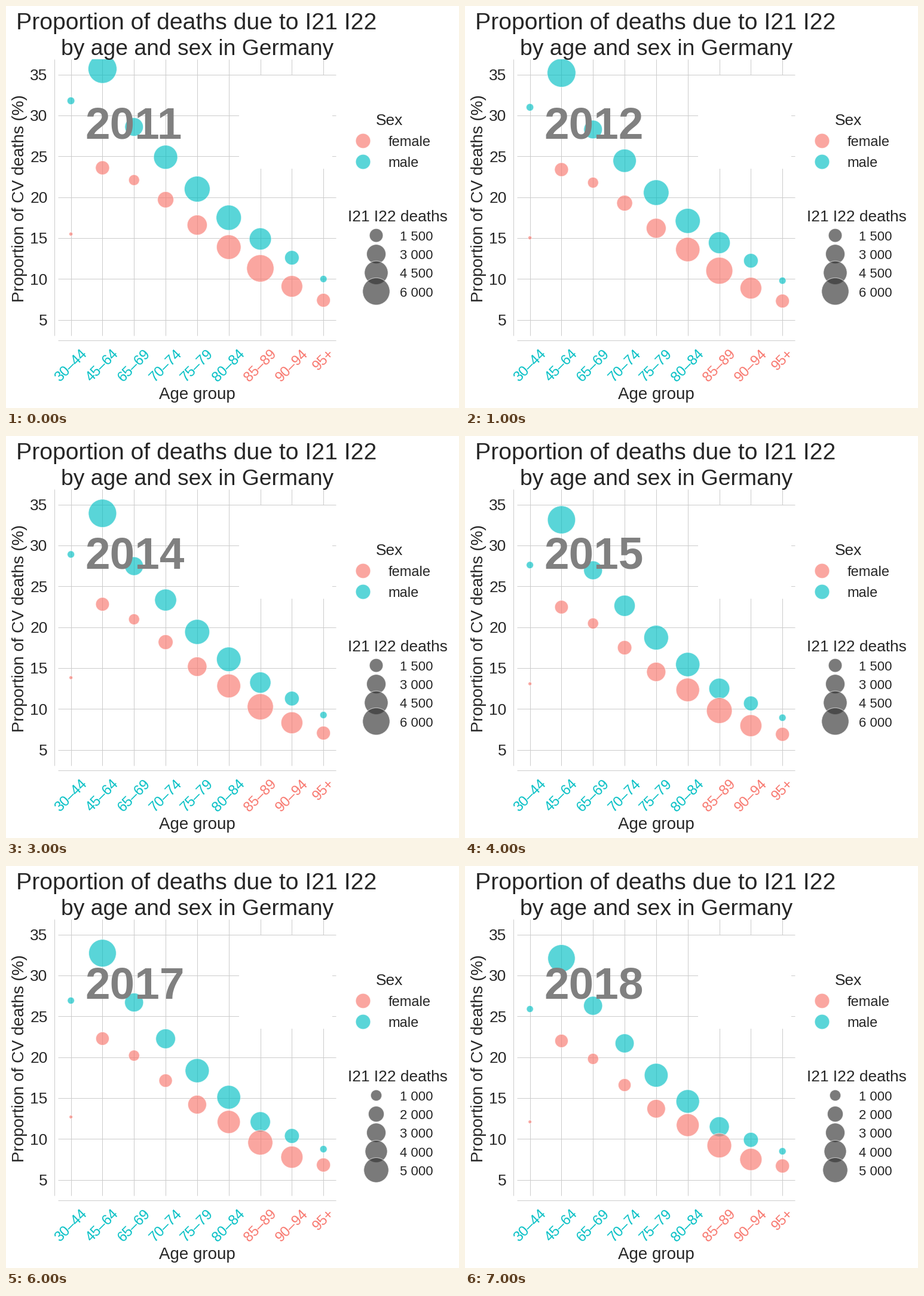
Animation, 758 px wide and 672 px high, one loop 8 s. Source, as a matplotlib script:

```python
import numpy as np
import matplotlib.pyplot as plt
from matplotlib.animation import FuncAnimation
from matplotlib.patches import Circle, Rectangle

W, H, DPI = 758, 672, 100
PX = 72 / DPI  # points per pixel
INK, GRID = "#262626", "#cccccc"
FEMALE, MALE, DARK = "#F8766D", "#00BFC4", "#333333"
LEFT, RIGHT, TOP, BOTTOM = 87, 552, 89, 551
AGES = ["30–44", "45–64", "65–69", "70–74", "75–79",
        "80–84", "85–89", "90–94", "95+"]
FIRST, LAST = 2011, 2018
AGE_X = 108.62 + 52.82 * np.arange(len(AGES))

# Per sex and age group: share in the first and last year, first radius
GROUPS = {
    MALE: ([31.8, 35.7, 28.6, 24.9, 21, 17.5, 14.9, 12.6, 10],
           [25.9, 32.1, 26.3, 21.7, 17.8, 14.6, 11.5, 9.9, 8.5],
           [6.3, 24, 15.4, 20, 21.5, 21, 18.4, 12, 5.9]),
    FEMALE: ([15.5, 23.6, 22.1, 19.7, 16.6, 13.9, 11.3, 9.1, 7.4],
             [12.1, 22, 19.8, 16.6, 13.7, 11.7, 9.2, 7.5, 6.7],
             [3.1, 11.6, 9, 13.5, 16.7, 20.4, 22.7, 17.9, 11.4]),
}
# Change of the radius by age, the same for both sexes
GROWTH = np.array([0.9, 0.95, 1.02, 0.79, 0.92, 0.93, 0.9, 1.03, 1.02])

plt.rcParams["font.family"] = "Liberation Sans"
fig = plt.figure(figsize=(W / DPI, H / DPI), dpi=DPI, facecolor="white")
ax = fig.add_axes([0, 0, 1, 1])
ax.set(xlim=(0, W), ylim=(H, 0))
ax.axis("off")


def share_y(share):
    return 114.7 + 13.666 * (35 - share)


def text(x, y, s, size, color=INK, **kw):
    kw.setdefault("va", "baseline")
    return ax.text(x, y, s, fontsize=size * PX, color=color, **kw)


def line(x0, y0, x1, y1):
    ax.plot([x0, x1], [y0, y1], color=GRID, lw=PX, zorder=1,
            solid_capstyle="butt")


def bubble(x, y, r, color):
    return ax.add_patch(Circle((x, y), r, facecolor=color, alpha=0.65,
                               edgecolor="white", lw=PX, zorder=2))


def size_legend(values):
    rows = []
    for i, n in enumerate(values):
        y = 383.5 + 31.2 * i
        label = f"{n:,}".replace(",", " ")
        rows.append((bubble(619.5, y, np.sqrt(0.086 * n), DARK),
                     text(659.2, y + 8.5, label, 22.2)))
    return rows


def show(rows, count):
    for i, row in enumerate(rows):
        for part in row:
            part.set_visible(i < count)


# Grid, spines and ticks
for value in range(5, 36, 5):
    y = share_y(value)
    line(LEFT, y, RIGHT, y)
    text(69.7, y + 9.2, str(value), 26.4, ha="right")
for i, (x, age) in enumerate(zip(AGE_X, AGES)):
    line(x, TOP, x, BOTTOM)
    text(x + 0.3, 570, age, 23.6, MALE if i < 6 else FEMALE,
         ha="center", va="top", rotation=45)
line(81, TOP, 81, BOTTOM)
line(LEFT, 559, RIGHT, 559)
ax.add_patch(Rectangle((390, 116), 156, 156, color="white", lw=0, zorder=1.5))

# Titles
text(17.2, 39, "Proportion of deaths due to I21 I22", 39.2)
text(91.7, 82, "by age and sex in Germany", 37.2)
text(320, 657, "Age group", 27.8, ha="center")
text(30, 321.5, "Proportion of CV deaths (%)", 27.8, ha="center",
     rotation=90, rotation_mode="anchor")

# Legends
text(619, 199, "Sex", 26.4)
for y, name, color in [(225.5, "female", FEMALE), (260.5, "male", MALE)]:
    bubble(597.5, y, 12.4, color)
    text(639.5, y + 8.5, name, 23.6)
text(571.7, 360, "I21 I22 deaths", 26.3)
coarse = size_legend(range(1500, 6001, 1500))
fine = size_legend(range(1000, 6001, 1000))

# Moving parts
plot_area = Rectangle((LEFT, TOP), RIGHT - LEFT, BOTTOM - TOP,
                      transform=ax.transData)
dots = {sex: [bubble(x, 0, 1, sex) for x in AGE_X] for sex in GROUPS}
for dot in sum(dots.values(), []):
    dot.set_clip_path(plot_area)
year_text = text(132.7, 221.3, "", 74.8, "#808080", weight="bold", zorder=3)


def decline(year):
    """Part of the whole fall reached so far, with a rebound after 2015."""
    return np.interp(year, [FIRST, 2013, 2015, 2016, LAST],
                     [0, 0.27, 0.71, 0.65, 1])


def update(i):
    year = FIRST + i
    scale = 1 + (GROWTH - 1) * i / (LAST - FIRST)
    for sex, (start, end, radius) in GROUPS.items():
        shares = start + (np.array(end) - start) * decline(year)
        for dot, x, y, r in zip(dots[sex], AGE_X, share_y(shares),
                                radius * scale):
            dot.center = x, y
            dot.set_radius(r)
    year_text.set_text(str(year))
    show(coarse, 4 if year < 2016 else 0)
    show(fine, 0 if year < 2016 else 6 if year == 2016 else 5)
    return []


anim = FuncAnimation(fig, update, frames=LAST - FIRST + 1, interval=1000,
                     repeat=True, repeat_delay=0)
plt.show()
```
